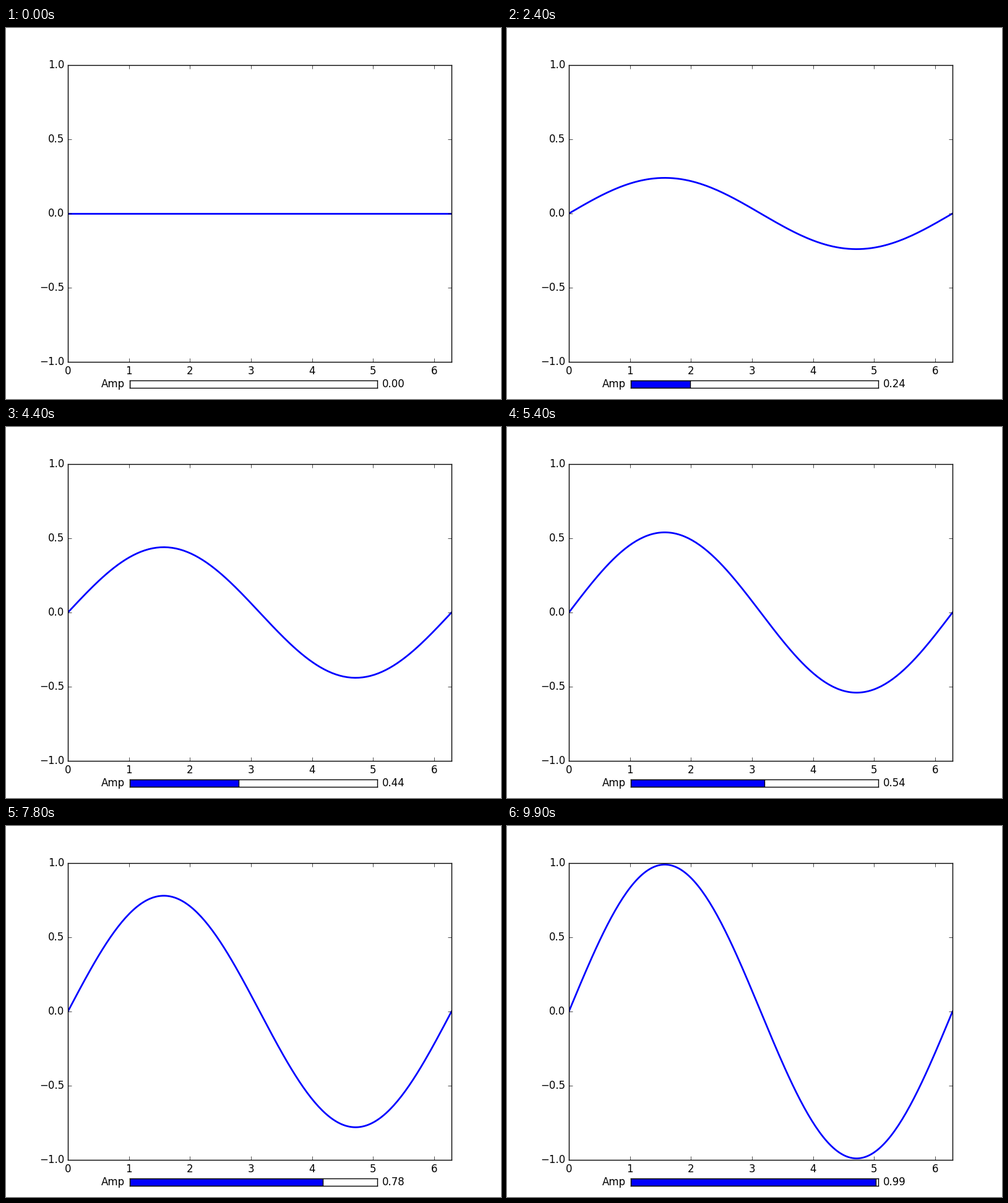
Write a matplotlib script that moves like this. It is 800 by 600 pixels and loops after 10 s.

```python
import numpy as np
import matplotlib.pyplot as plt
from matplotlib.animation import FuncAnimation
from matplotlib.patches import Rectangle

FRAMES = 100

plt.style.use("classic")
plt.rcParams.update({
    "font.family": "DejaVu Sans",
    "font.size": 12,
    "figure.facecolor": "white",
    "savefig.facecolor": "white",
    "savefig.dpi": 100,
    "ytick.alignment": "center",
})

fig = plt.figure(figsize=(8, 6), dpi=100)

# Sine plot
ax = fig.add_axes([0.125, 0.1, 0.775, 0.8])
x = np.linspace(0, 2 * np.pi, 200)
wave, = ax.plot(x, np.zeros_like(x), color="blue", lw=2)
ax.set_xticks(range(7))
ax.set_yticks(np.linspace(-1, 1, 5))
ax.set_xlim(0, 2 * np.pi)
ax.set_ylim(-1, 1)

# Amplitude slider
bar_ax = fig.add_axes([0.25, 0.03, 0.5, 0.02])
bar_ax.set(xlim=(0, 1), ylim=(0, 1), xticks=[], yticks=[])
bar = bar_ax.add_patch(Rectangle((0, 0), 0, 1, fc="blue", ec="black", lw=1))
bar_ax.text(-0.02, 0.5, "Amp", ha="right", va="center")
value = bar_ax.text(1.02, 0.5, "0.00", ha="left", va="center")


def update(i):
    amp = i / FRAMES
    wave.set_ydata(amp * np.sin(x))
    bar.set_width(amp)
    value.set_text(f"{amp:.2f}")
    return wave, bar, value


anim = FuncAnimation(fig, update, frames=FRAMES, interval=100,
                     repeat=True, repeat_delay=0, blit=False)
plt.show()
```
